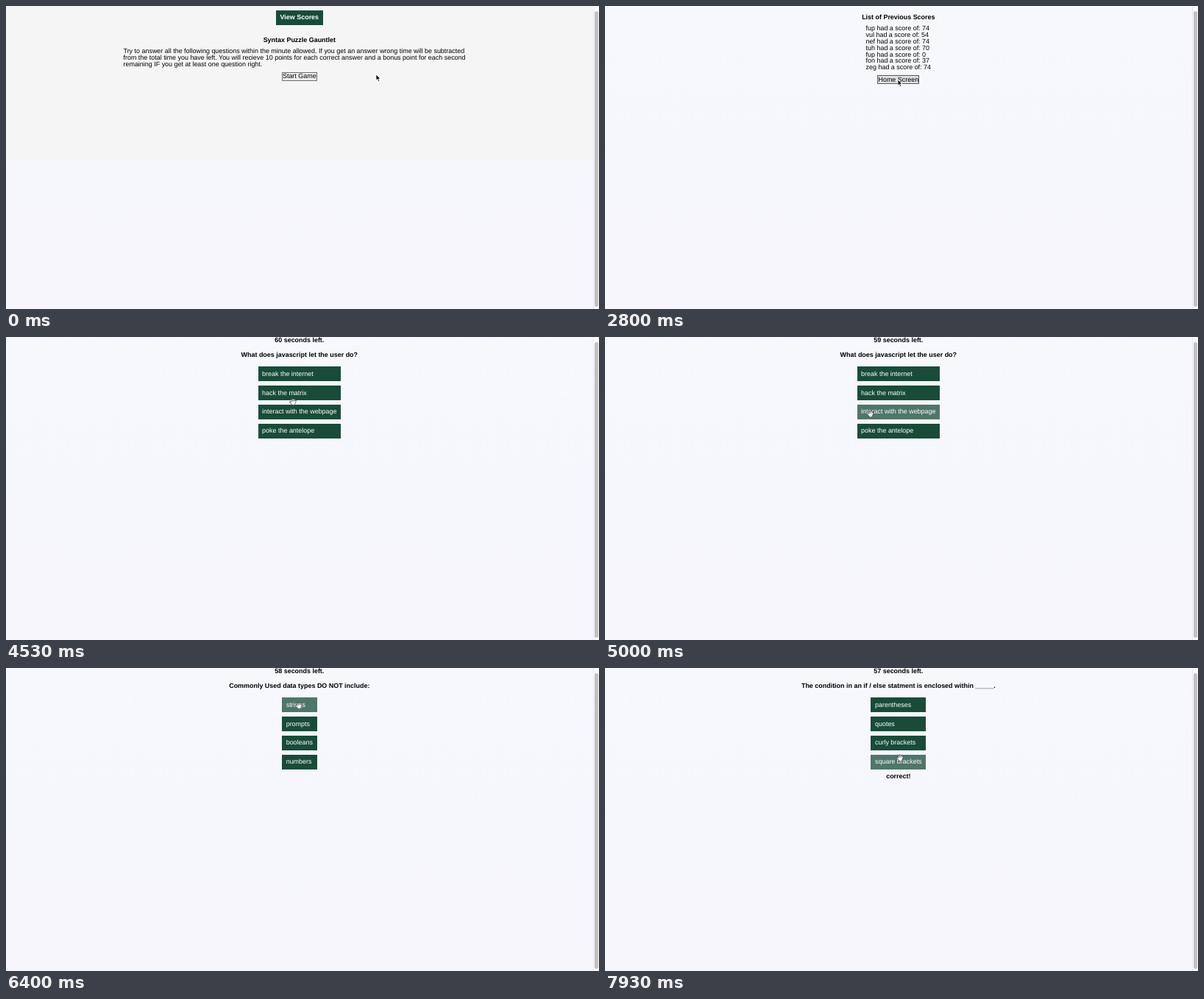
These frames come from a looping animation (806x412 px, 8000 ms). An HTML page:

```html
<!DOCTYPE html>
<html lang="en">
<head>
<meta charset="utf-8">
<title>Quiz</title>
<style>
  html, body { margin: 0; width: 100%; height: 100%; overflow: hidden; }
  body {
    position: relative;
    background: linear-gradient(#f6f8fc, #f6f6fc);
    font: 8.955px/1 "Liberation Sans", Arial, sans-serif;
    color: #000;
    text-rendering: geometricPrecision;
    white-space: nowrap;
    cursor: default;
  }
  #shade { position: absolute; inset: 0 8px auto 0; height: 210px; background: #f5f5f5; }
  .page { visibility: hidden; }
  .page.on { visibility: visible; }
  .row { position: absolute; left: 0; width: 797.6px; text-align: center; }
  .bold { font-weight: bold; }
  .fit { display: grid; width: fit-content; margin: 0 auto; text-align: left; }
  .list { gap: .625em; }
  .btn { padding: .625em; background: #184c39; color: #fff; }
  .btn.hover { opacity: .75; }
  .plain { padding: .3px 0; border: 1px solid #6e6e6e; background: #ececec; }
  .plain.hover { border-color: #5a5a5a; background: #dfdfdf; }
  #picked { background: linear-gradient(#93b4c9, #93b4c9) 0 0 / 0 100% no-repeat; }
  #bar { position: absolute; right: 0; top: 0; width: 7px; height: 100%; background: #fafafa; border-left: 1px solid #e9e9ec; }
  #bar i { position: absolute; left: 1px; top: 7px; width: 5px; height: 402px; border-radius: 3px; background: #c1c1c1; }
  #cursor { position: absolute; left: 0; top: 0; width: 10px; height: 10px; overflow: visible; }
</style>
</head>
<body>
<div id="shade"></div>

<div class="page" id="home">
  <div class="row bold" style="top:5.6px"><div class="fit btn">View Scores</div></div>
  <div class="row bold" style="top:42.4px">Syntax Puzzle Gauntlet</div>
  <div class="row" style="top:57.1px;left:159.5px;text-align:left">Try to answer all the following questions within the minute allowed. If you get an answer wrong time will be subtracted<br>from the total time you have left. You will recieve 10 points for each correct answer and a bonus point for each second<br>remaining IF you get at least one question right.</div>
  <div class="row" style="top:90px"><div class="fit plain">Start Game</div></div>
</div>

<div class="page" id="scores">
  <div class="row bold" style="top:11.2px">List of Previous Scores</div>
  <div class="row" style="top:25.7px"><div class="fit" id="table"></div></div>
  <div class="row" style="top:94.4px"><div class="fit plain">Home Screen</div></div>
</div>

<div class="page" id="quiz">
  <div class="row bold" style="top:0" id="timer"></div>
  <div class="row bold" style="top:20.2px" id="ask"></div>
  <div class="row" style="top:40.3px"><div class="fit list" id="answers"></div></div>
  <div class="row bold" style="top:143.3px" id="verdict">correct!</div>
</div>

<div id="bar"><i></i></div>

<svg id="cursor" viewBox="0 0 16 16">
  <path id="arrow" d="M0 0V13L3 10.2L5 15L7.4 14L5.4 9.4H9.4Z" fill="#000" stroke="#fff" stroke-width="1.3"/>
  <g id="hand" transform="translate(-8 -8)" stroke-linecap="round" stroke-linejoin="round">
    <g fill="#333" stroke="#333" stroke-width="3.4"><use href="#fingers"/></g>
    <g fill="#fff" stroke="#fff" stroke-width="1.7">
      <path id="fingers" d="M4.5 11L2 8.6M6 9L4.8 4M8.2 9L8 2.6M10.3 9L11.2 3.4M12 10L13.8 6.4M4.5 10L6 8.6H12L11.6 11.6L10 14H7Z"/>
    </g>
  </g>
</svg>

<script>
const LOOP = 8000;
const $ = id => document.getElementById(id);

const scores = [["fup", 74], ["vul", 54], ["nef", 74], ["tuh", 70], ["fup", 0], ["fon", 37], ["zeg", 74]];
$("table").innerHTML = scores.map(([who, n]) => `<div>${who} had a score of: ${n}</div>`).join("");

const questions = [
  ["What does javascript let the user do?",
    ["break the internet", "hack the matrix", '<span id="picked">interact </span>with the webpage', "poke the antelope"]],
  ["Commonly Used data types DO NOT include:",
    ["strings", "prompts", "booleans", "numbers"]],
  ["The condition in an if / else statment is enclosed within _____.",
    ["parentheses", "quotes", "curly brackets", "square brackets"]]
];

// [start time, page, question]
const scenes = [[0, "home"], [1800, "scores"], [2860, "home"], [3860, "quiz", 0], [5660, "quiz", 1], [7400, "quiz", 2]];
const ticks = [[0, 60], [4930, 59], [5930, 58], [6930, 57]];
const praise = [[5660, 5930], [7400, LOOP]];

// [time, x, y] of the pointer's hot spot
const path = [
  [0, 503, 93], [400, 408, 100], [560, 408, 100], [1330, 404, 14],
  [1960, 404, 14], [2530, 398, 100], [2960, 398, 100], [3730, 397, 95],
  [4020, 397, 95], [4330, 392, 52], [4530, 390, 88], [4700, 387, 132],
  [4860, 374, 108], [5130, 349, 101], [5600, 381, 97],
  [5760, 381, 97], [6400, 398, 51], [6820, 398, 51], [7260, 396, 76],
  [7560, 396, 76], [7930, 401, 122], [LOOP, 401, 122]
];

const latest = (table, t) => table.filter(row => row[0] <= t).pop();
const clamp = v => Math.min(1, Math.max(0, v));

function pointer(t) {
  const i = path.findIndex(p => p[0] > t);
  const [t0, x0, y0] = path[i - 1], [t1, x1, y1] = path[i];
  const k = (t - t0) / (t1 - t0), e = k * k * (3 - 2 * k);
  return [x0 + (x1 - x0) * e, y0 + (y1 - y0) * e];
}

function over(el, x, y) {
  const r = el.getBoundingClientRect();
  return x >= r.left && x < r.right && y >= r.top && y < r.bottom;
}

let shown = -1;
function ask(n) {
  if (n === shown) return;
  shown = n;
  $("ask").textContent = questions[n][0];
  $("answers").innerHTML = questions[n][1].map(a => `<div class="btn">${a}</div>`).join("");
}

function draw(t) {
  const [, page, n] = latest(scenes, t);
  document.querySelectorAll(".page").forEach(p => p.classList.toggle("on", p.id === page));
  $("shade").style.visibility = t < 600 ? "visible" : "hidden";

  if (page === "quiz") {
    ask(n);
    $("timer").textContent = `${latest(ticks, t)[1]} seconds left.`;
    $("verdict").style.opacity = praise.some(([a, b]) => t >= a && t < b) ? 1 : 0;
    if (n === 0) $("picked").style.backgroundSize = `${100 * clamp((t - 5130) / 450)}% 100%`;
  }

  const [x, y] = pointer(t);
  let grab = page === "quiz" && over($("answers"), x, y);
  $(page).querySelectorAll(".btn, .plain").forEach(b => {
    const hit = over(b, x, y);
    b.classList.toggle("hover", hit);
    if (hit && b.classList.contains("btn")) grab = true;
  });
  $("hand").style.display = grab ? "" : "none";
  $("arrow").style.display = grab ? "none" : "";
  $("cursor").style.transform = `translate(${x}px, ${y}px)`;
}

const start = performance.now();
function frame() {
  draw((performance.now() - start) % LOOP);
  requestAnimationFrame(frame);
}
frame();
</script>
</body>
</html>
```
